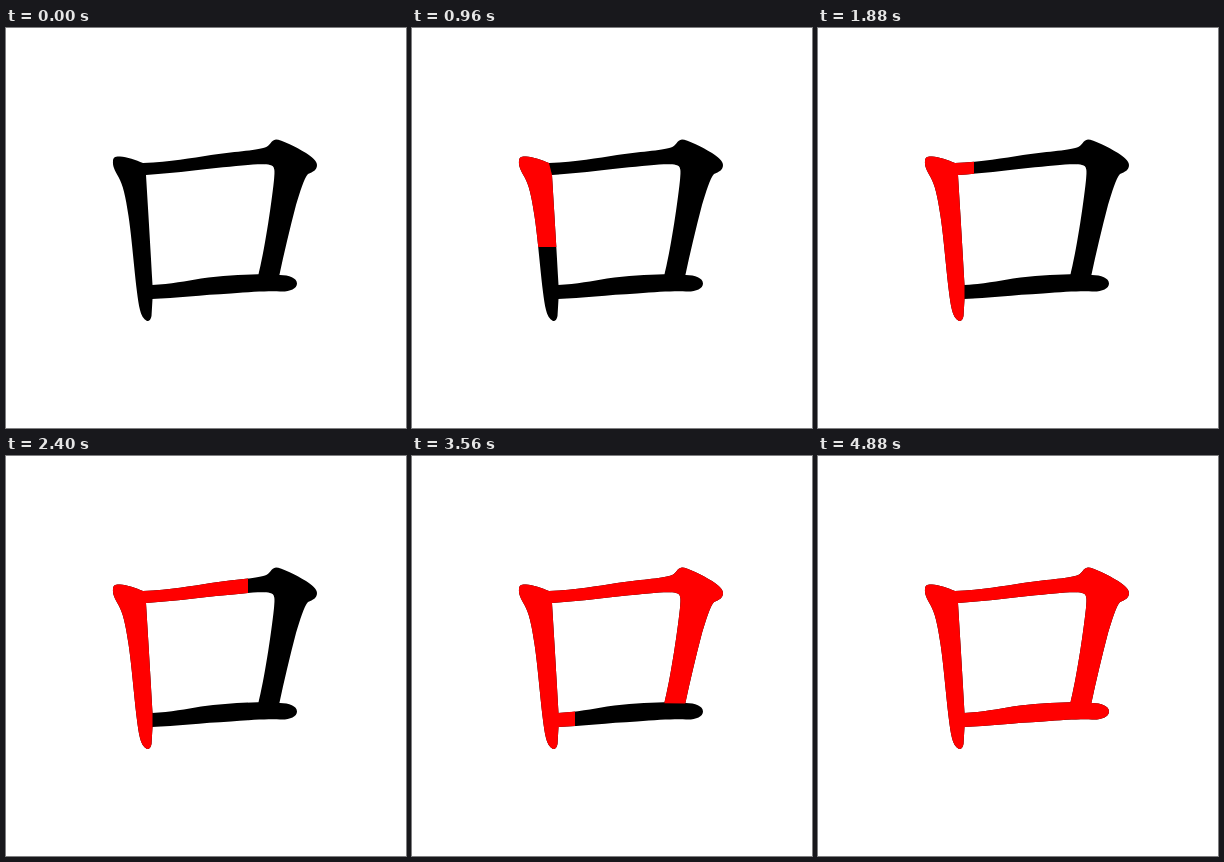
An HTML page for the animation above (4960 ms loop, 400 by 400 pixels).

```html
<!DOCTYPE html>
<html lang="en">
<head>
<meta charset="utf-8">
<title>Stroke order</title>
<style>
  html, body { margin: 0; width: 100%; height: 100%; overflow: hidden; background: #fff; }
  svg { display: block; width: 100%; height: 100%; }
</style>
</head>
<body>
<svg viewBox="0 0 400 400">
  <defs>
    <path id="left" d="M107 133C107 129.500 109 128.300 114 128.500C121 129 130 132 137 135L140 147C142 180 144.500 220 146.500 257L146.500 271L145.500 288C145 291.500 143 293.500 141 293C137.500 291 135 287 134 282C129.500 262 127 218 122.500 188C119.500 168 117 157 112.500 149C108.500 142 106.500 138 107 133Z"/>
    <path id="corner" d="M134 135L137 135C165 134 185 130 205 127C225 124 250 122.500 259 119.500C264 118 265 112 270 111.500C275 111.500 290 119 300 125C306 129 311 133 311 137C311 142 307 144 302 146C298 150 294 164 290 177C284 200 278 225 273.300 247.500L252.300 247.200C258 225 265 180 268 152C269 142 269 138 264 137C255 135 235 138 210 140C185 143 165 145 140 147L134 147Z"/>
    <path id="base" d="M142 257L146 257C165 256 180 253 195 250.500C215 248 235 246.500 252 246.300L274 247C283 247 291 250 291 255.500C291 261 283 264 274 263.500C262 263 245 264 225 265.500C195 267 170 270 146 271L142 271Z"/>
    <clipPath id="c0"><path id="wipe0"/></clipPath>
    <clipPath id="c1"><path id="wipe1"/></clipPath>
    <clipPath id="c2"><path id="wipe2"/></clipPath>
  </defs>
  <rect width="400" height="400" fill="#fff"/>
  <g fill="#000">
    <use href="#left"/><use href="#corner"/><use href="#base"/>
  </g>
  <g fill="#f00">
    <g clip-path="url(#c0)"><use href="#left"/></g>
    <g clip-path="url(#c1)"><use href="#corner"/></g>
    <g clip-path="url(#c2)"><use href="#base"/></g>
  </g>
</svg>
<script>
const LOOP = 4960, STEP = 40, LAST = 122, TURN = 265;
const wipes = [0, 1, 2].map(i => document.getElementById('wipe' + i));
const box = (x, y, right, bottom) =>
  `M${x} ${y}H${Math.max(x, right)}V${Math.max(y, bottom)}H${x}Z`;

function draw(time) {
  const k = Math.min(LAST, Math.floor((time % LOOP) / STEP));

  // left stroke, downwards
  wipes[0].setAttribute('d', box(0, 0, 400, Math.round(126 + 3.857 * k)));

  // top stroke, rightwards, then down past the corner
  const across = Math.round(132 + 6.6 * (k - 43.4));
  const down = Math.round(111 + 6.6 * (k - 63.5));
  let d = box(0, 0, k < 44 ? 0 : Math.min(across, TURN), 160);
  if (down > 111) d += `M${TURN} 0H400V${down - 4}L${TURN} ${down + 1}H240V160H${TURN}Z`;
  if (down > 160) d = `M0 0H400V${down - 4}L240 ${down + 2}H0Z`;
  wipes[1].setAttribute('d', d);

  // bottom stroke, rightwards
  const base = Math.round(163 + 4.05 * (k - 89));
  wipes[2].setAttribute('d', box(0, 0, k < 84 ? 0 : base, 400));
}

const start = performance.now();
function tick() {
  draw(performance.now() - start);
  requestAnimationFrame(tick);
}
draw(0);
requestAnimationFrame(tick);
</script>
</body>
</html>
```
